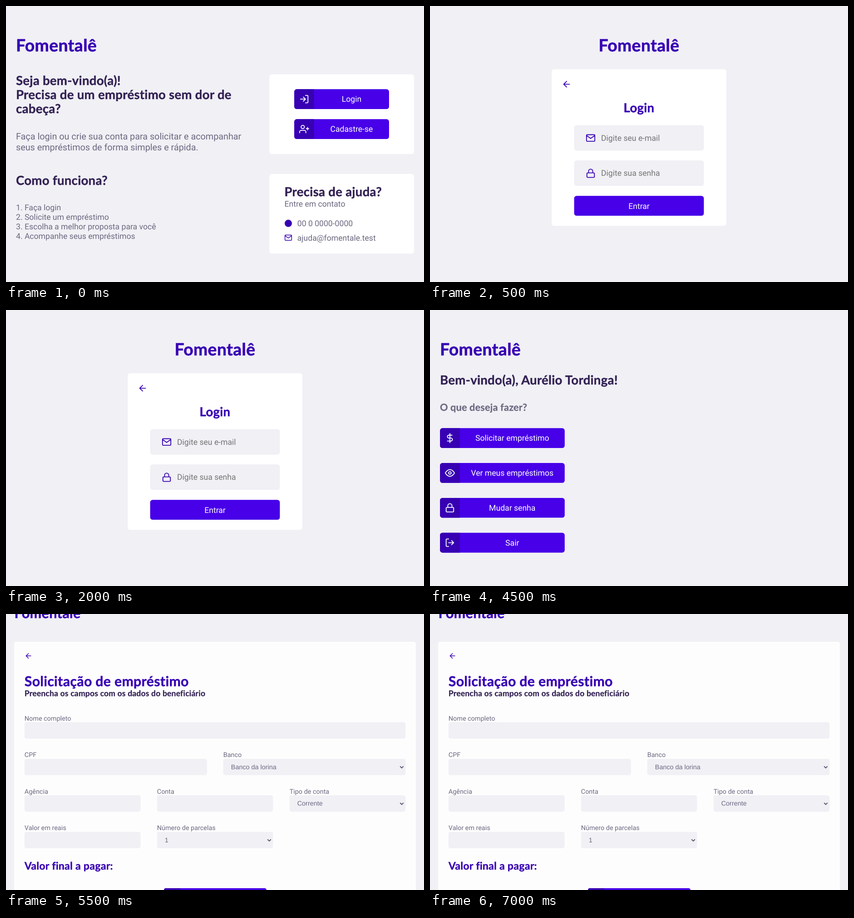
An HTML page that plays this animation: 921 px wide and 608 px high, repeating every 8000 ms.

```html
<!DOCTYPE html>
<html lang="pt-BR">
<head>
<meta charset="utf-8">
<title>Empréstimos</title>
<style>
  html, body { margin: 0; width: 100%; height: 100%; overflow: hidden; background: #f0f0f5; }
  svg { display: block; width: 921px; height: 608px; text-rendering: geometricPrecision; }
  .head {
    font-family: Lato, sans-serif; font-weight: 700; letter-spacing: 0.0115em;
    font-variant-ligatures: none; stroke-width: 0.016em;
  }
  .body { font-family: Roboto, sans-serif; }
  .pick { font-family: "Liberation Sans", Arial, sans-serif; }
  .icon { fill: none; stroke-width: 2; stroke-linecap: round; stroke-linejoin: round; }
</style>
</head>
<body>
<svg id="stage" viewBox="0 0 921 608"></svg>
<script>
const BG = '#f0f0f5', DARK = '#3700b3', MAIN = '#4700e8';
const TITLE = '#322153', TEXT = '#6c6880', HINT = '#757575';
const BRAND = 'Fomentalê';
const LOOP = 8000;

// Line icons on a 24 unit grid
const ICONS = {
  login: 'M15 3h4a2 2 0 0 1 2 2v14a2 2 0 0 1-2 2h-4M10 17l5-5-5-5M15 12H3',
  logout: 'M9 21H5a2 2 0 0 1-2-2V5a2 2 0 0 1 2-2h4M16 17l5-5-5-5M21 12H9',
  userPlus: 'M16 21v-2a4 4 0 0 0-4-4H5a4 4 0 0 0-4 4v2M12.5 7a4 4 0 1 1-8 0a4 4 0 1 1 8 0M20 8v6M23 11h-6',
  mail: 'M4 4h16a2 2 0 0 1 2 2v12a2 2 0 0 1-2 2H4a2 2 0 0 1-2-2V6a2 2 0 0 1 2-2zM22 6l-10 7L2 6',
  lock: 'M5 11h14a2 2 0 0 1 2 2v7a2 2 0 0 1-2 2H5a2 2 0 0 1-2-2v-7a2 2 0 0 1 2-2zM7 11V7a5 5 0 0 1 10 0v4',
  back: 'M19 12H5M12 19l-7-7 7-7',
  dollar: 'M12 1v22M17 5H9.5a3.5 3.5 0 0 0 0 7h5a3.5 3.5 0 0 1 0 7H6',
  eye: 'M1 12s4-8 11-8 11 8 11 8-4 8-11 8-11-8-11-8zM15 12a3 3 0 1 1-6 0a3 3 0 1 1 6 0'
};

const text = (cls, str, x, y, size, fill, anchor = 'start', stroke = 'none') =>
  `<text class="${cls}" x="${x}" y="${y}" font-size="${size}" fill="${fill}" stroke="${stroke}" text-anchor="${anchor}">${str}</text>`;
const head = (str, x, y, size = 27.5, fill = TITLE, anchor = 'start') => text('head', str, x, y, size, fill, anchor, fill);
const body = (str, x, y, size = 17.6, fill = TEXT, anchor = 'start') => text('body', str, x, y, size, fill, anchor);
const box = (x, y, w, h, fill, r = 5.5) =>
  `<rect x="${x}" y="${y}" width="${w}" height="${h}" rx="${r}" fill="${fill}"/>`;
const icon = (name, cx, cy, scale = 0.917, color = DARK) =>
  `<path class="icon" d="${ICONS[name]}" stroke="${color}" transform="translate(${cx} ${cy}) scale(${scale}) translate(-12 -12)"/>`;

// Button with a darker square end, optionally holding an icon and label
function button(x, y, w, label, name, h = 43.7, r = 5.5) {
  const end = `<path d="M${x + h} ${y}H${x + r}a${r} ${r} 0 0 0 ${-r} ${r}v${h - 2 * r}a${r} ${r} 0 0 0 ${r} ${r}H${x + h}z" fill="${DARK}"/>`;
  return box(x, y, w, h, MAIN, r) + end +
    (name ? icon(name, x + h / 2, y + h / 2, 0.917, '#fff') : '') +
    body(label, x + (w + h) / 2, y + h / 2 + 6.3, 17.6, '#fff', 'middle');
}

function field(label, x, y, w, choice) {
  let out = body(label, x, y - 3.6, 14.4) + box(x, y, w, 36, BG, 4.5);
  if (choice) {
    out += text('pick', choice, x + 17, y + 22.8, 14.4, TEXT) +
      `<path d="M${x + w - 12} ${y + 16.5}l3.7 3.7 3.7-3.7" fill="none" stroke="#5b566b" stroke-width="1.9"/>`;
  }
  return out;
}

function home() {
  const steps = ['Faça login', 'Solicite um empréstimo', 'Escolha a melhor proposta para você', 'Acompanhe seus empréstimos'];
  return head(BRAND, 22, 99.5, 37.2, DARK) +
    head('Seja bem-vindo(a)!', 22, 174.3) +
    head('Precisa de um empréstimo sem dor de', 22, 205.3) +
    head('cabeça?', 22, 236.3) +
    body('Faça login ou crie sua conta para solicitar e acompanhar', 22, 294, 19.8) +
    body('seus empréstimos de forma simples e rápida.', 22, 318.2, 19.8) +
    head('Como funciona?', 22, 394) +
    steps.map((s, i) => body(`${i + 1}. ${s}`, 22, 450 + i * 20.9)).join('') +
    box(580.3, 150.5, 318.7, 175.5, '#fff') +
    button(635.2, 183.3, 208.8, 'Login', 'login') +
    button(635.2, 249.3, 208.8, 'Cadastre-se', 'userPlus') +
    box(580.3, 370, 318.7, 175.5, '#fff') +
    head('Precisa de ajuda?', 613.5, 419) +
    body('Entre em contato', 613.5, 442.3) +
    `<circle cx="622" cy="478.8" r="8" fill="${DARK}"/>` +
    body('00 0 0000-0000', 641.8, 485) +
    icon('mail', 622, 510.3, 0.733) +
    body('ajuda@fomentale.test', 641.8, 517);
}

function login() {
  const input = (y, name, hint) => box(317.6, y, 285.8, 56, BG) +
    icon(name, 354, y + 28.3) + body(hint, 377, y + 34, 17.6, HINT);
  return head(BRAND, 460.5, 99.5, 37.2, DARK, 'middle') +
    box(268, 139.3, 385, 345, '#fff') +
    icon('back', 301, 172.3) +
    head('Login', 460.5, 234, 27.5, DARK, 'middle') +
    input(262.5, 'mail', 'Digite seu e-mail') +
    input(340.2, 'lock', 'Digite sua senha') +
    box(317.6, 418.2, 285.8, 43.8, MAIN) +
    body('Entrar', 460.5, 446.6, 17.6, '#fff', 'middle');
}

function menu() {
  const items = [['Solicitar empréstimo', 'dollar'], ['Ver meus empréstimos', 'eye'], ['Mudar senha', 'lock'], ['Sair', 'logout']];
  return head(BRAND, 22, 99.5, 37.2, DARK) +
    head('Bem-vindo(a), Aurélio Tordinga!', 22, 163.5) +
    head('O que deseja fazer?', 22, 222, 21.5, TEXT) +
    items.map(([label, name], i) => button(22, 260.3 + i * 76.8, 274.8, label, name)).join('');
}

function request() {
  return head(BRAND, 18.5, 9, 30.5, DARK) +
    box(18, 61, 885, 600, '#fdfdfd', 4.5) +
    icon('back', 49.5, 92.2, 0.75) +
    head('Solicitação de empréstimo', 40.8, 158.5, 30.2, DARK) +
    head('Preencha os campos com os dados do beneficiário', 40.8, 181, 17.5) +
    field('Nome completo', 40.8, 238.5, 839.4) +
    field('CPF', 40.8, 319, 402) +
    field('Banco', 478.8, 319, 401.4, 'Banco da lorina') +
    field('Agência', 40.8, 399.5, 255.6) +
    field('Conta', 332.8, 399.5, 255.6) +
    field('Tipo de conta', 624.7, 399.5, 255.6, 'Corrente') +
    field('Valor em reais', 40.8, 480, 255.6) +
    field('Número de parcelas', 332.8, 480, 255.6, '1') +
    head('Valor final a pagar:', 40.8, 563, 23.1, DARK) +
    button(348, 604, 226, '', '', 36, 4.5);
}

const scenes = [
  { from: 0, draw: home },
  { from: 500, draw: login },
  { from: 3000, draw: menu },
  { from: 5500, draw: request }
];

const stage = document.getElementById('stage');
stage.innerHTML = `<rect width="921" height="608" fill="${BG}"/>` +
  scenes.map(s => `<g visibility="hidden">${s.draw()}</g>`).join('');
const groups = stage.querySelectorAll('g');

function render(ms) {
  const t = ms % LOOP;
  const now = scenes.filter(s => s.from <= t).length - 1;
  groups.forEach((g, i) => g.setAttribute('visibility', i === now ? 'visible' : 'hidden'));
}

function tick() {
  render(performance.now());
  requestAnimationFrame(tick);
}
tick();
</script>
</body>
</html>
```
